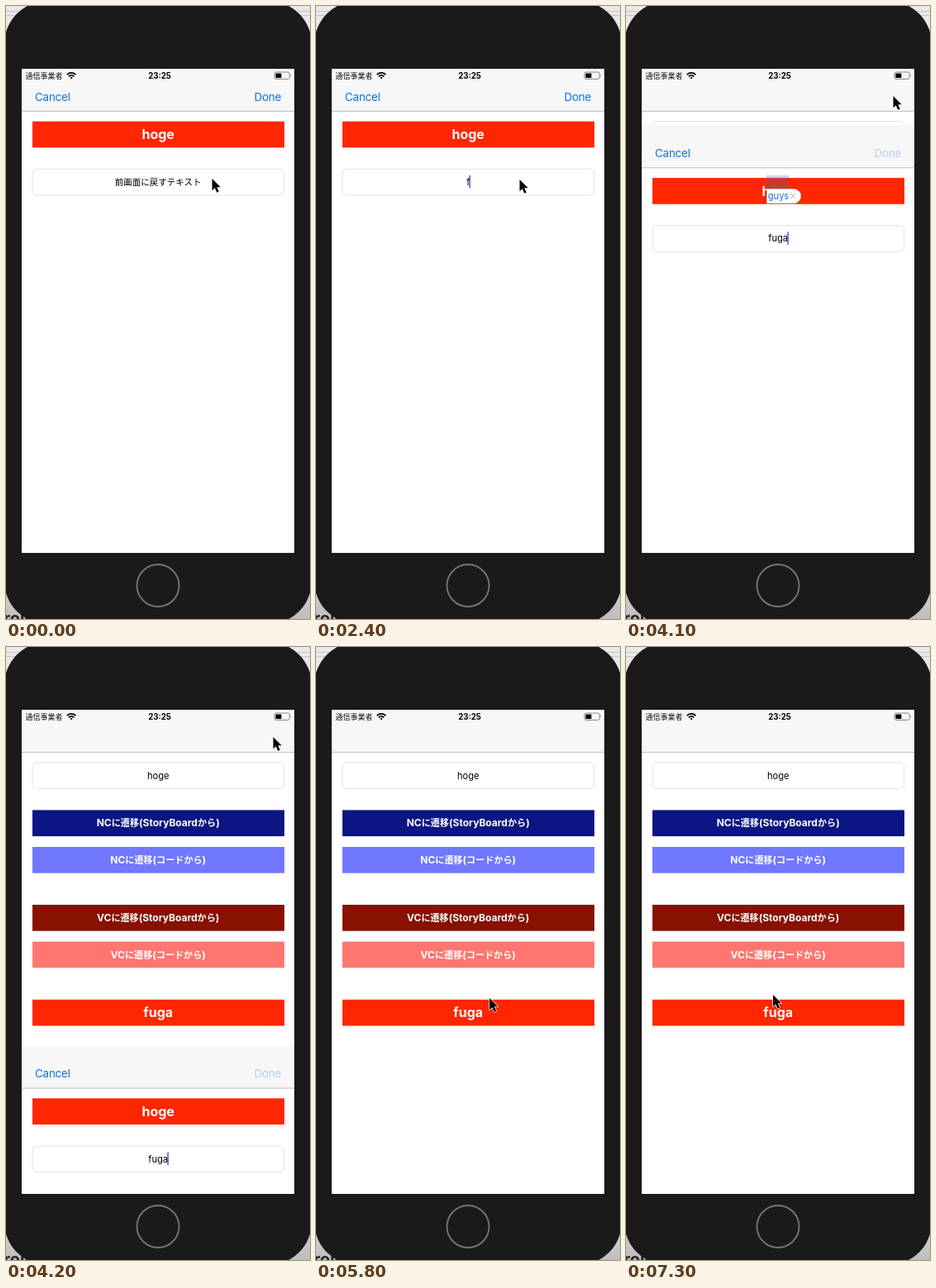
An HTML page for the animation above (7.4 s loop, 368 px wide and 742 px high).

```html
<!DOCTYPE html>
<html lang="ja">
<head>
<meta charset="utf-8">
<title>Modal form</title>
<style>
html, body { margin: 0; width: 100%; height: 100%; overflow: hidden; background: #e4e4e4; }
svg { display: block; width: 368px; height: 742px; }
text { font-family: Inter, "Noto Sans CJK JP", "Noto Sans CJK", sans-serif; white-space: pre; }
.mid { text-anchor: middle; }
.field { fill: #fff; stroke: #dedede; stroke-width: .9; }
.big { font-size: 16px; font-weight: 700; fill: #fff; }
.btn { font-size: 12px; font-weight: 700; fill: #fff; }
.btn .jp { font-size: 11.1px; }
.body { font-size: 11.1px; }
.nav { font-size: 13.4px; letter-spacing: -.2px; fill: #0a72e8; }
</style>
</head>
<body>
<svg viewBox="0 0 368 742">
  <defs>
    <linearGradient id="page" x2="0" y2="1">
      <stop offset="0" stop-color="#e9e9e9"/>
      <stop offset=".95" stop-color="#d2d2d2"/>
      <stop offset="1" stop-color="#bdbdbd"/>
    </linearGradient>
    <clipPath id="glass"><rect x="19" y="76" width="330" height="586"/></clipPath>
  </defs>

  <rect width="368" height="742" fill="url(#page)"/>
  <path d="M0 6.5H368M0 11.5H368" stroke="#c4c4c4"/>
  <text x="-3" y="748" font-size="20" font-weight="700" fill="#222">roller</text>
  <rect x="-2" y="-6" width="372" height="754" rx="52" fill="#1a1a1a"/>
  <circle cx="184" cy="701.5" r="25.5" fill="none" stroke="#747474" stroke-width="1.9"/>

  <g clip-path="url(#glass)">
    <g id="main"></g>
    <g id="sheet"></g>
    <g id="hint">
      <rect x="170" y="205" width="27.5" height="16.5" fill="#3c6eb4" fill-opacity=".28"/>
      <path d="M170.5 221.5H203a8.7 8.7 0 0 1 0 17.4H170.5Z" fill="#fff" stroke="#b9bdc2" stroke-width=".8"/>
      <text class="body mid" x="184.5" y="234" fill="#1a6fd6">guys</text>
      <path d="M199.2 227l6 6m0-6l-6 6" stroke="#b0b0b0"/>
    </g>
    <g id="status">
      <text x="23.5" y="88" font-size="9" fill="#111">通信事業者</text>
      <g fill="none" stroke="#000" stroke-width="1.7">
        <path d="M73.8 83.2a7.4 7.4 0 0 1 10.6 0M75.9 85.3a4.4 4.4 0 0 1 6.4 0"/>
        <path d="M77.5 86.6a2.4 2.4 0 0 1 3.2 0L79.1 88.4Z" fill="#000" stroke="none"/>
      </g>
      <text class="mid" x="186" y="88" font-size="9.7" font-weight="700">23:25</text>
      <rect x="325" y="80" width="18.2" height="8.4" rx="2" fill="none" stroke="#777" stroke-width=".9"/>
      <rect x="326.4" y="81.4" width="7" height="5.6" rx=".6"/>
      <path d="M344.4 82.6q1.4 1.6 0 3.2Z" fill="#777"/>
    </g>
  </g>

  <path id="cursor" d="M0 0V14.3L3.3 11.3L5.7 16.8L8.2 15.7L5.8 10.3H10.2Z"
    stroke="#fff" stroke-width="1.3" paint-order="stroke" stroke-linejoin="round"/>
</svg>
<script>
const LOOP = 7400, STEP = 100;
const el = id => document.getElementById(id);

const box = (y, fill) => `<rect x="32" y="${y}" width="305" height="31.7" fill="${fill}"/>`;
const field = y => `<rect class="field" x="32" y="${y}" width="304.6" height="31.7" rx="5"/>`;
const label = (y, cls, s, id = "") =>
  `<text class="mid ${cls}" id="${id}" x="184.2" y="${y}">${s}</text>`;
const jp = s => s.replace(/[\u3040-\u30ff\u4e00-\u9fff]+/g, m => `<tspan class="jp">${m}</tspan>`);
const button = (y, fill, s) => box(y, fill) + label(y + 20, "btn", jp(s));
const screen = `<rect x="19" y="76" width="330" height="586" fill="#fff"/>
  <rect x="19" y="76" width="330" height="51" fill="#f7f7f7"/>
  <path d="M19 127.4H349" stroke="#b4b4b4" stroke-width=".9"/>`;

el("main").innerHTML = screen + field(139.7) + label(159.5, "body", "hoge") +
  button(197.4, "#0b1583", "NCに遷移(StoryBoardから)") +
  button(242, "#6f78ff", "NCに遷移(コードから)") +
  button(312, "#881100", "VCに遷移(StoryBoardから)") +
  button(356.6, "#ff7670", "VCに遷移(コードから)") +
  box(426.8, "#ff2600") + label(448.2, "big", "fuga");

el("sheet").innerHTML = screen +
  `<text class="nav" x="35" y="114.8">Cancel</text>
   <text class="nav" id="done" x="333.2" y="114.8" text-anchor="end">Done</text>` +
  box(139.7, "#ff2600") + label(161.2, "big", "hoge") +
  field(197.4) + label(217, "", "", "input") +
  `<rect id="caret" y="205" width="1.5" height="15.5" fill="#4659d6"/>`;

// [ms, typed text, caret x]
const typing = [
  [0, "前画面に戻すテキスト", 236], [1600, "", 183.5], [2400, "f", 185.4],
  [2500, "fu", 188.8], [2700, "fug", 192.6], [2800, "fuga", 195.3]
];
// [ms, caret opacity]
const blink = [
  [0, 0], [1400, 1], [2000, .5], [2100, 0], [2200, .5], [2300, 1],
  [3200, .5], [3300, 0], [3700, .5], [3800, 1]
];
// [ms, x, y]
const path = [
  [0, 249.5, 209], [100, 249, 209], [500, 246.5, 210], [3000, 246.5, 210],
  [3100, 254, 204], [3200, 286, 172], [3300, 330, 122], [3400, 355, 92],
  [3500, 342, 101], [3600, 332, 106], [3800, 323.5, 109], [4200, 323.5, 109],
  [4300, 318, 132], [4400, 301, 220], [4500, 280, 320], [4600, 263, 388],
  [4700, 253, 419], [4900, 252, 462], [5050, 215, 492], [5250, 168, 482],
  [5400, 154, 452], [5600, 173, 429], [5800, 210, 425], [5950, 245, 445],
  [6100, 240, 478], [6250, 205, 494], [6400, 165, 476], [6500, 158, 445],
  [6650, 195, 422], [6800, 245, 432], [6900, 250, 465], [7000, 195, 484],
  [7100, 158, 440], [7200, 162, 426], [7300, 178, 421]
];

const held = (rows, t) => rows.filter(r => r[0] <= t).pop();

function along(rows, t) {
  const a = held(rows, t), b = rows[rows.indexOf(a) + 1] || a;
  const k = a === b ? 0 : (t - a[0]) / (b[0] - a[0]);
  return [a[1] + (b[1] - a[1]) * k, a[2] + (b[2] - a[2]) * k];
}

// Critically damped slide of the sheet
function slide(t) {
  const x = Math.max(0, t - 4068) * .01826;
  return 586 * (1 - (1 + x) * Math.exp(-x));
}

function draw(t) {
  const [, text, x] = held(typing, t);
  const input = el("input");
  input.textContent = text;
  input.style.fontSize = t < 1600 ? "10.5px" : "11.1px";
  el("caret").setAttribute("x", x);
  el("caret").setAttribute("opacity", held(blink, t)[1]);
  el("done").setAttribute("opacity", t >= 3900 ? .3 : 1);
  el("hint").style.display = t >= 2800 && t < 4200 ? "" : "none";
  el("sheet").style.display = t < 4600 ? "" : "none";
  el("sheet").setAttribute("transform", `translate(0 ${slide(t).toFixed(1)})`);
  el("cursor").setAttribute("transform", `translate(${along(path, t)})`);
}

const start = performance.now();
function tick() {
  const t = (performance.now() - start) % LOOP;
  draw(Math.floor(t / STEP) * STEP);
  requestAnimationFrame(tick);
}
tick();
</script>
</body>
</html>
```
